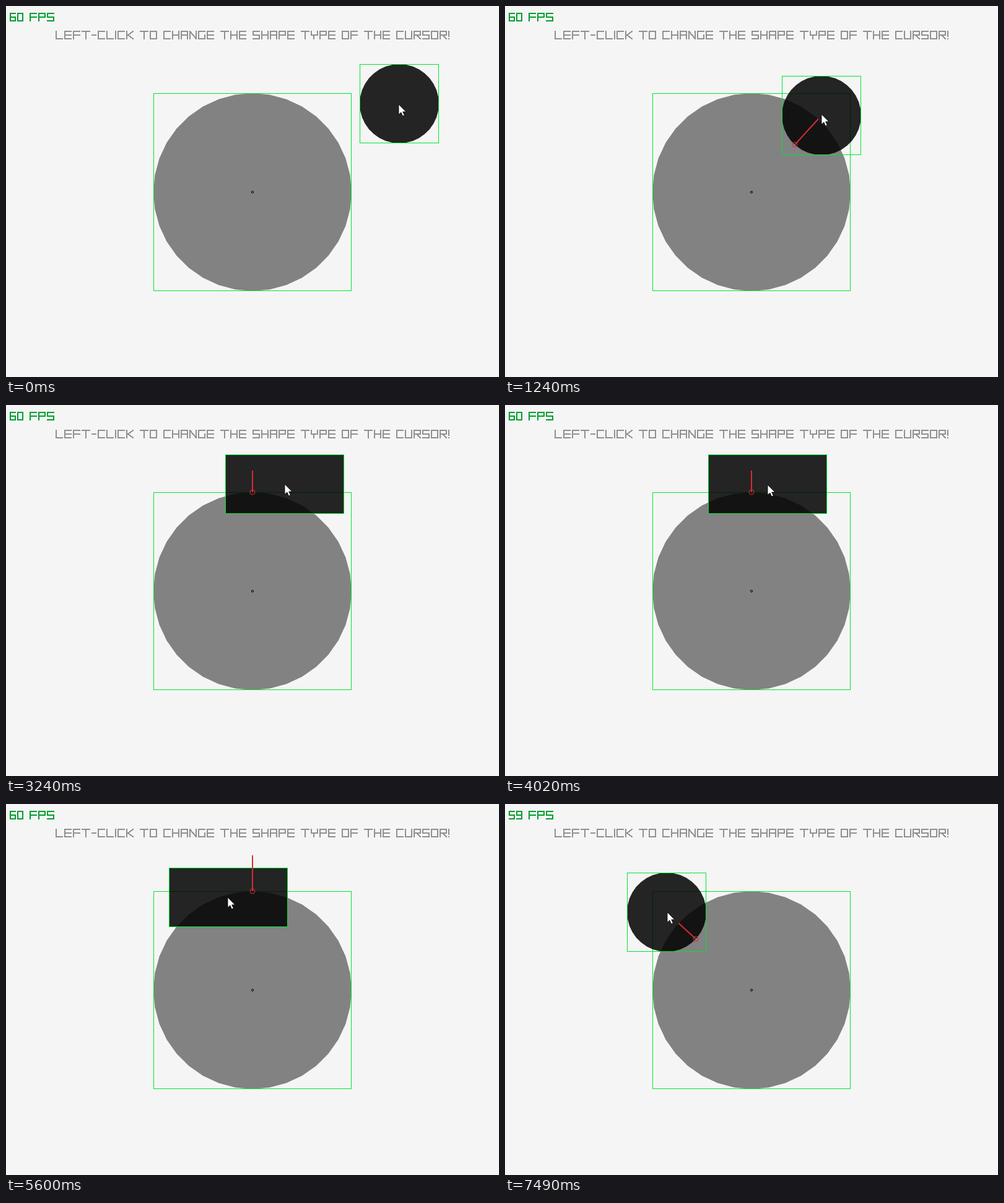
Write an HTML page that moves like this. It is 796x600 px and loops after 7.51 s.

```html
<!DOCTYPE html>
<html lang="en">
<head>
<meta charset="utf-8">
<title>Shape collision</title>
<style>
  html, body { margin: 0; width: 100%; height: 100%; overflow: hidden; background: #f5f5f5; }
  svg { display: block; }
  text { font: 18px "DejaVu Sans Mono", monospace; fill: transparent; }
  .pixel { fill: none; stroke-linecap: square; shape-rendering: crispEdges; }
  .bounds { fill: none; stroke: #00e430; shape-rendering: crispEdges; }
  .hit { fill: none; stroke: #d92b36; }
</style>
</head>
<body>
<svg width="796" height="600" viewBox="0 0 796 600">
  <rect width="796" height="600" fill="#f5f5f5"/>
  <polygon id="disc" fill="#828282"/>
  <rect id="discBounds" class="bounds"/>
  <circle cx="398" cy="301" r="1.6" fill="none" stroke="#000"/>
  <g id="fps"></g>
  <g id="heading"></g>
  <g id="body" fill="#000" fill-opacity=".85">
    <polygon id="ball"/>
    <rect id="box" x="-96" y="-48" width="192" height="96"/>
  </g>
  <rect id="bounds" class="bounds"/>
  <g id="contact" class="hit">
    <line id="depth" stroke-width="2"/>
    <circle id="point" r="4"/>
  </g>
  <path id="mouse" d="M0 0V16.5L3.8 13L6.5 19L9.3 17.8L6.7 12H11.8Z" fill="#fff" stroke="#000" stroke-width=".8"/>
</svg>
<script>
const $ = id => document.getElementById(id);
const set = (el, attrs) => { for (const k in attrs) el.setAttribute(k, attrs[k]); };

const LOOP = 7510;
const DISC = { x: 398, y: 301, r: 160 };
const BALL = 64, HALF_W = 96, HALF_H = 48;
const CURSOR_LEAD = 30;

// Hand gestures: start, end, and the point reached; still in between
const HOME = [635, 158];
const GESTURES = [
  [20, 260, 554, 180], [600, 1240, 511, 177], [1240, 1340, 508, 169],
  [1360, 1640, 536, 162], [1870, 2180, 488, 145], [2340, 3240, 450, 128],
  [3240, 3880, 425, 128], [3980, 4820, 391, 144], [5060, 5800, 350, 153],
  [5820, 6350, 307, 159], [6350, 6510, 290, 171], [6580, 7490, 261, 175]
];
const boxAt = t => t >= 2980 && t < 6000;
const fpsAt = t => t % 2500 < 2000 ? 60 : 59;

// Segment letters, a-g as on a seven-segment display:
// m and l full and lower centre stem, n r k diagonals, p dotted stem
const GLYPHS = {
  L: 'def', E: 'adefg', F: 'aefg', T: 'am', C: 'adef', I: 'm', K: 'efk', O: 'abcdef',
  H: 'bcefg', A: 'abcefg', N: 'bcefn', G: 'acdef', S: 'acdfg', Y: 'bfgl', P: 'abefg',
  U: 'bcdef', R: 'abefgr', '-': 'g', '!': 'p', ' ': '',
  6: 'acdefg', 0: 'abcdef', 5: 'acdfg', 9: 'abcdfg'
};
const glyphWidth = ch =>
  ch === 'T' ? 7 : 'I!'.includes(ch) ? 1 : ch === '-' ? 4 : ch === ' ' ? 3 : /\d/.test(ch) ? 5 : 6;

function glyph(ch) {
  const w = glyphWidth(ch) - 1, mid = Math.floor(w / 2);
  const segments = {
    a: `M0 0H${w}`, g: `M0 3H${w}`, d: `M0 6H${w}`,
    f: 'M0 0V3', e: 'M0 3V6', b: `M${w} 0V3`, c: `M${w} 3V6`,
    m: `M${mid} 0V6`, l: `M${mid} 3V6`, p: 'M0 0V4M0 6h.01',
    n: `M0 0L${w} 6`, r: `M2 3L${w} 6`, k: `M${w} 0L1 3L${w} 6`
  };
  return [...GLYPHS[ch]].map(s => segments[s]).join('');
}

function write(group, string, x, y, color) {
  let col = 0, marks = '';
  for (const ch of string) {
    marks += `<path d="${glyph(ch)}" transform="translate(${col} 0)"/>`;
    col += glyphWidth(ch) + 1;
  }
  group.innerHTML = `<g class="pixel" stroke="${color}" aria-hidden="true"
    transform="translate(${x + 1} ${y + 1}) scale(2)">${marks}</g>
    <text x="${x}" y="${y + 14}">${string}</text>`;
}

const ring = (cx, cy, r) => Array.from({ length: 36 }, (_, i) => {
  const a = i * Math.PI / 18;
  return `${(cx + r * Math.cos(a)).toFixed(2)},${(cy + r * Math.sin(a)).toFixed(2)}`;
}).join(' ');

function frame(el, x, y, w, h) {
  set(el, { x: x - w + .5, y: y - h + .5, width: 2 * w - 1, height: 2 * h - 1 });
}

// Halfway between constant speed and smoothstep
const ease = k => (k + k * k * (3 - 2 * k)) / 2;

function position(t) {
  let [x, y] = HOME;
  for (const [start, end, toX, toY] of GESTURES) {
    if (t <= start) break;
    const k = ease(Math.min(1, (t - start) / (end - start)));
    x += (toX - x) * k;
    y += (toY - y) * k;
  }
  return [Math.round(x), Math.round(y)];
}

// Contact point on the surface and the vector out of the overlap
function collide(x, y, isBox) {
  if (isBox) {
    const top = DISC.y - DISC.r;
    return { x: DISC.x, y: top, dx: 0, dy: -1, depth: y + HALF_H - top };
  }
  const dist = Math.hypot(DISC.x - x, DISC.y - y);
  const dx = (x - DISC.x) / dist, dy = (y - DISC.y) / dist;
  return { x: x - dx * BALL, y: y - dy * BALL, dx, dy, depth: DISC.r + BALL - dist };
}

let shownFps;
function draw(t) {
  const [x, y] = position(t);
  const isBox = boxAt(t);

  set($('body'), { transform: `translate(${x} ${y})` });
  set($('ball'), { visibility: isBox ? 'hidden' : 'visible' });
  set($('box'), { visibility: isBox ? 'visible' : 'hidden' });
  frame($('bounds'), x, y, isBox ? HALF_W : BALL, isBox ? HALF_H : BALL);

  const c = collide(x, y, isBox);
  set($('contact'), { visibility: c.depth > 0 ? 'visible' : 'hidden' });
  set($('point'), { cx: c.x, cy: c.y });
  set($('depth'), { x1: c.x, y1: c.y, x2: c.x + c.dx * c.depth, y2: c.y + c.dy * c.depth });

  const [mouseX, mouseY] = position(t + CURSOR_LEAD);
  set($('mouse'), { transform: `translate(${mouseX + 1} ${mouseY})` });

  const fps = fpsAt(t);
  if (fps !== shownFps) write($('fps'), `${shownFps = fps} FPS`, 6, 11, '#009e2f');
}

set($('disc'), { points: ring(DISC.x, DISC.y, DISC.r) });
set($('ball'), { points: ring(0, 0, BALL) });
frame($('discBounds'), DISC.x, DISC.y, DISC.r, DISC.r);
write($('heading'), 'LEFT-CLICK TO CHANGE THE SHAPE TYPE OF THE CURSOR!', 80, 40, '#909090');

const start = performance.now();
function tick() {
  draw((performance.now() - start) % LOOP);
  requestAnimationFrame(tick);
}
tick();
</script>
</body>
</html>
```
